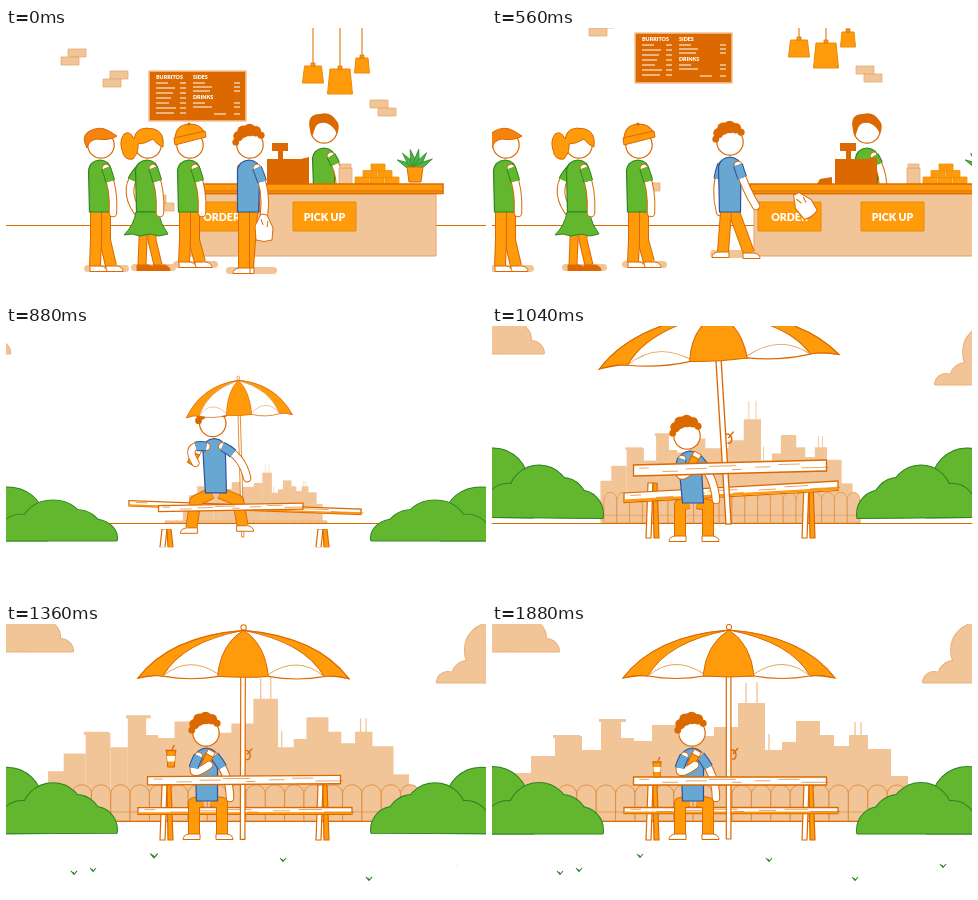
Write an HTML page with a canvas that moves like this. It is 480 px wide and 270 px high and loops after 3200 ms.

```html
<!DOCTYPE html>
<html lang="en">
<head>
<meta charset="utf-8">
<title>From the queue to the park</title>
<style>
html, body { margin: 0; width: 100%; height: 100%; overflow: hidden; background: #fff; }
canvas { display: block; width: 100vw; height: 100vh; }
</style>
</head>
<body>
<canvas id="stage"></canvas>
<script>
const canvas = document.getElementById('stage');
const c = canvas.getContext('2d');
const LOOP = 3200, STEP = 40;
const ORANGE = '#ff9b0b', DARK = '#dc6900', TAN = '#f2c598', EDGE = '#e3a468', GREEN = '#62b72f',
      LEAF = '#2d8422', BLUE = '#69a7d3', NAVY = '#2e519c', WHITE = '#fff';

// Smooth interpolation through rows of [time, ...values].
function at(t, ...rows) {
  const n = rows.length - 1;
  if (t <= rows[0][0]) return rows[0].slice(1);
  if (t >= rows[n][0]) return rows[n].slice(1);
  const i = rows.findIndex(r => r[0] > t) - 1, a = rows[i], b = rows[i + 1];
  const h = b[0] - a[0], u = (t - a[0]) / h;
  const slope = (k, j) => k < 1 || k >= n ? 0
    : (rows[k + 1][j] - rows[k - 1][j]) / (rows[k + 1][0] - rows[k - 1][0]);
  return a.slice(1).map((v, k) => {
    const j = k + 1;
    return v * (1 + 2 * u) * (1 - u) ** 2 + b[j] * u * u * (3 - 2 * u)
      + h * (slope(i, j) * u * (1 - u) ** 2 + slope(i + 1, j) * u * u * (u - 1));
  });
}
// Accelerating exit: `dist` is the travel reached after 480 ms.
const exit = (t, dist, power) => dist * (Math.max(0, t - 80) / 480) ** power;
const mix = (a, b, k) => a + (b - a) * k;

function group(x, y, draw, rot = 0, sx = 1, sy = sx) {
  c.save();
  c.translate(x, y);
  c.rotate(rot);
  c.scale(sx, sy);
  draw();
  c.restore();
}
function paint(fill, line, w = 1) {
  if (fill) { c.fillStyle = fill; c.fill(); }
  if (line) { c.strokeStyle = line; c.lineWidth = w; c.stroke(); }
}
function box(x, y, w, h, fill, line, lw) {
  c.beginPath(); c.rect(x, y, w, h); paint(fill, line, lw);
}
// Upright trapezoid around x, from top to bottom.
function taper(x, top, bottom, wTop, wBottom, fill, line, lw) {
  c.beginPath();
  c.moveTo(x - wTop / 2, top); c.lineTo(x + wTop / 2, top);
  c.lineTo(x + wBottom / 2, bottom); c.lineTo(x - wBottom / 2, bottom);
  c.closePath(); paint(fill, line, lw);
}
function pill(x, y, w, h, fill) {
  c.beginPath(); c.roundRect(x, y, w, h, h / 2); paint(fill);
}
function seg(x1, y1, x2, y2, color = DARK, w = 1) {
  c.beginPath(); c.moveTo(x1, y1); c.lineTo(x2, y2); paint(null, color, w);
}
function disc(x, y, r, fill, line, w) {
  c.beginPath(); c.arc(x, y, r, 0, 7); paint(fill, line, w);
}
function shape(d, fill, line, w = 1) {
  const p = new Path2D(d);
  if (fill) { c.fillStyle = fill; c.fill(p); }
  if (line) { c.strokeStyle = line; c.lineWidth = w; c.stroke(p); }
}
function text(s, x, y, size, align = 'left') {
  c.font = `900 ${size}px Lato, sans-serif`;
  c.textAlign = align;
  c.fillStyle = WHITE;
  c.fillText(s, x, y);
}
// Union of circles cut flat at a base line.
function blob(base, line, fill, ...circles) {
  c.save();
  c.beginPath(); c.rect(-200, base - 400, 900, 400); c.clip();
  for (const k of circles) disc(...k, null, line, 2);
  for (const k of circles) disc(...k, fill);
  c.restore();
  seg(Math.min(...circles.map(k => k[0] - k[2])), base, Math.max(...circles.map(k => k[0] + k[2])), base, line);
}

// ---- people ----
function tube(w, fill, line, trace) {
  c.lineJoin = 'round';
  for (const [width, color] of [[w + 2, line], [w, fill]]) {
    c.beginPath(); trace(); paint(null, color, width);
  }
  c.lineJoin = 'miter';
}
// `bend` pushes the elbow sideways from the shoulder-hand line.
function arm(ax, ay, hx, hy, bend, shirt, line) {
  const dx = hx - ax, dy = hy - ay, len = Math.hypot(dx, dy) || 1, k = .3;
  const bx = (ax + hx) / 2 - dy / len * bend, by = (ay + hy) / 2 + dx / len * bend;
  const mx = mix(ax, bx, k), my = mix(ay, by, k);
  c.lineCap = 'round';
  tube(6.5, WHITE, DARK, () => { c.moveTo(ax, ay); c.quadraticCurveTo(bx, by, hx, hy); });
  c.lineCap = 'butt';
  tube(8, shirt, line, () => {
    c.moveTo(ax, ay);
    c.quadraticCurveTo(mx, my, mix(mx, mix(bx, hx, k), k), mix(my, mix(by, hy, k), k));
  });
}
const leg = (hx, hy, kx, ky, fx, fy, w = 10) =>
  tube(w, ORANGE, DARK, () => { c.moveTo(hx, hy); c.lineTo(kx, ky); c.lineTo(fx, fy); });
const shoe = (x, y, dir = 1, rot = 0, fill = WHITE) => group(x, y, () => {
  c.rotate(rot);
  shape('M-6 0H5Q11 1 11 5.5H-6Z', fill, DARK);
}, 0, dir, 1);
function torso(sx, sy, hx, hy, fill, line) {
  c.beginPath();
  c.moveTo(hx - 10.5, hy); c.lineTo(sx - 11.5, sy + 9);
  c.quadraticCurveTo(sx - 10, sy, sx, sy - 1);
  c.quadraticCurveTo(sx + 10, sy, sx + 11, sy + 9);
  c.lineTo(hx + 10.5, hy); c.closePath();
  paint(fill, line, 1.2);
}
const HAIR = {
  short: () => shape('M-14 3Q-20-8-13-13Q-2-20 8-14L16-9Q9-4-4-6Q-12-5-14 3Z', '#f6820f', DARK),
  pony: () => shape('M-14-6Q-12-20 6-16Q17-13 15 2Q9 0 5-6Q-3-1-10-1Q-9 7-15 14Q-24 16-26 5Q-29-4-24-11Q-18-15-14-6Z', ORANGE, DARK),
  beanie: () => {
    shape('M-15-5Q-15-20-1-21Q13-21 15-9Z', ORANGE, DARK, 1.2);
    shape('M-16-7L15-14L16-8L-15 0Z', ORANGE, DARK);
    disc(-1, -21, 1.5, DARK);
  },
  curly: () => {
    for (let i = 0; i < 6; i++) {
      const a = -2.95 + i * .45;
      disc(14.5 * Math.cos(a), 15 * Math.sin(a), 3.4 + 3 * Math.sin(i * .62), DARK);
    }
  },
  clerk: () => shape('M-14 0Q-18-16-4-16Q6-19 12-10Q17-5 13 4Q10-4 2-7Q-8-9-10 1L-12 7Z', DARK)
};
function head(x, y, hair) {
  disc(x, y, 13.2, WHITE, DARK, 1.2);
  group(x, y, HAIR[hair]);
}
function queuer(x, hair, floor) {
  const woman = hair === 'pony', w = woman ? 7 : 10, sole = woman ? DARK : WHITE;
  group(x, 0, () => {
    pill(-17, floor - 1, 45, 7, TAN);
    if (woman) arm(-7, 140, -11, 183, 18, GREEN, LEAF);
    for (const [hip, foot] of [[4, 10], [-5, -6]]) {
      leg(hip, 184, hip, 212, foot, floor, w);
      shoe(foot + 1, floor, 1, 0, sole);
    }
    torso(-1, 133, -1, 184, GREEN, LEAF);
    if (woman) shape('M-12 184H10Q13 197 20 206L11 208L2 206L-8 208L-16 206L-24 207Q-14 197-12 184Z', GREEN, LEAF);
    arm(5, 140, 12, 185, -5, GREEN, LEAF);
    head(0, 117, hair);
  });
}
function hero(t) {
  const pose = (...p) => at(t, ...[80, 560, 720, 1040].map((time, i) => [time, ...p[i]]));
  const [x, y] = at(t, [80, 244, 117], [560, 238, 114], [720, 222, 89], [1040, 195, 110], [1200, 200, 109]);
  const [hx, hy] = pose([242, 184], [238, 184], [225, 158], [201, 177]);
  const handL = pose([250, 182, -8], [228, 184, 7], [180, 140, 9], [203, 141, 29]);
  const handR = pose([258, 187, -7], [264, 178, 3], [265, 131, -10], [224, 174, -8]);
  const footL = pose([238, 240], [231, 224], [190, 196], [188, 210]);
  const footR = pose([242, 240], [257, 225], [264, 192], [216, 210]);
  const [sit] = at(t, [720, 0], [1000, 1]);
  const [tilt] = at(t, [560, 0], [720, 1], [880, 0]);
  const sx = (x + hx) / 2, sy = y + 16, seated = t > 800;

  const limb = (side, [fx, fy], dir, rot) => {
    const top = hx + side * 4;
    leg(top, hy, mix((top + fx) / 2, fx, sit), mix((hy + fy) / 2, hy + 2, sit), fx, fy);
    shoe(fx, fy, dir, rot);
  };
  const reach = (side, hand) => arm(sx + side * 8, sy + 7, ...hand, BLUE, NAVY);

  if (!seated) reach(-1, handL);
  limb(1, footR, t < 320 ? -1 : 1, -.8 * tilt);
  limb(-1, footL, -1, .5 * tilt);
  torso(sx, sy, hx, hy, BLUE, NAVY);
  reach(1, handR);
  head(x, y, 'curly');
  if (seated) {
    group(handL[0] - 1, handL[1] - 7, () => {
      box(-4, -8, 8, 10, WHITE, DARK);
      taper(0, -3, 9, 8, 6, ORANGE, DARK);
    }, .5);
    reach(-1, handL);
  }
}

// ---- restaurant ----
function bricks(x, y, flip) {
  box(x + (flip ? 0 : 7), y, 18, 8, TAN, EDGE, .7);
  box(x + (flip ? 8 : 0), y + 8, 18, 8, TAN, EDGE, .7);
}
function menu(y) {
  box(143, y, 97, 50, DARK, TAN, 1.5);
  text('BURRITOS', 150, y + 8, 5.4);
  text('SIDES', 187, y + 8, 5.4);
  text('DRINKS', 187, y + 28, 5.4);
  const rows = (x, dy, count, gap, end) => {
    for (let i = 0; i < count; i++) {
      const ly = y + dy + i * gap;
      seg(x, ly, x + 12 + i * 7 % 9, ly, WHITE);
      seg(end - 6, ly, end, ly, WHITE);
    }
  };
  rows(150, 12, 7, 5, 180);
  rows(187, 12, 3, 4, 234);
  rows(187, 32, 2, 4, 234);
  rows(208, 43, 1, 0, 234);
}
function lamp(x, y, w, h) {
  seg(x, -60, x, y);
  taper(x, y, y + h, w * .8, w, ORANGE, '#e98a08');
  box(x - 2, y - 3, 4, 3, ORANGE, DARK, .7);
}
function clerk() {
  torso(318, 121, 318, 158, GREEN, LEAF);
  arm(325, 128, 334, 157, -4, GREEN, LEAF);
  head(318, 102, 'clerk');
}
function sign(x, label) {
  box(x, 174, 63, 29, ORANGE, '#e98a08');
  text(label, x + 31.5, 192.5, 10.6, 'center');
}
function counter() {
  shape('M243 156L246 151L258 149V156ZM261 131H295L303 129V156H261ZM266 115H282V123H277V131H272V123H266Z', DARK);
  box(333, 140, 13, 16, TAN, EDGE, .7);
  box(334, 136, 11, 4, TAN, EDGE, .7);
  for (let row = 0; row < 3; row++)
    for (let i = 0; i < 3 - row; i++) box(349 + i * 15 + row * 8, 149 - row * 6.5, 14, 7, ORANGE, '#e98a08', .7);
  for (let i = 0; i < 6; i++) group(409, 141, () => shape('M-3 0Q-3-10 0-20Q3-10 3 0Z', '#49b349', LEAF, .7), -1.1 + i * .43);
  taper(409, 139, 154, 16, 12, ORANGE, DARK);
  box(180, 166, 250, 62, TAN, EDGE);
  box(176, 156, 261, 9.5, ORANGE, DARK, 1.5);
  seg(176, 163, 437, 163);
  sign(184, 'ORDER');
  sign(287, 'PICK UP');
}
function restaurant(t) {
  bricks(55, 21 - exit(t, 45, 4));
  bricks(97, 43 - exit(t, 51, 4));
  bricks(364, 72 - exit(t, 34, 4), true);
  bricks(142, 167 - exit(t, 20, 5.5), true);
  menu(43 - exit(t, 38, 4));
  group(0, -exit(t, 26, 4), () => {
    lamp(307, 38, 21, 17);
    lamp(334, 41, 25, 25);
    lamp(356, 30, 15, 15);
  });
  group(exit(t, 57, 4.3), 0, clerk);
  group(exit(t, 82, 3.57), 0, counter);
  queuer(95 - exit(t, 81, 4), 'short', 238);
  queuer(142 - exit(t, 55, 4.4), 'pony', 237);
  queuer(184 - exit(t, 37, 4.7), 'beanie', 234);
}
function bag(t) {
  if (t >= 840) return;
  const [x, y, rot, s] = at(t, [400, 258, 200, 0, 1], [560, 312, 177, -.6, 1], [720, 299, 87, -2.1, 1], [840, 204, 133, -3, .5]);
  group(x, y, () => shape('M-8 12L-9-2L-3-14L3-13L9 0L8 12Q0 15-8 12ZM-3-9L-1-3M4-7L3-1', WHITE, DARK), rot, s);
}

// ---- park ----
const TOWERS = [ // left, width, top
  [22, 18, 149], [39, 24, 132], [63, 27, 112], [90, 19, 126], [109, 20, 96], [128, 14, 114], [140, 21, 117],
  [160, 26, 101], [185, 38, 112], [222, 25, 103], [246, 27, 79], [272, 20, 126], [290, 16, 118], [304, 24, 97],
  [327, 15, 111], [340, 18, 122], [357, 19, 111], [374, 25, 125], [398, 18, 152]];
const MASTS = [[254, 59], [265, 58], [277, 110], [363, 98], [369, 98]];
function city(t) {
  if (t < 780) return;
  const [sx, sy] = at(t, [760, .1, 0], [900, .4, .5], [1040, .64, .88], [1200, .82, 1.04], [1560, .995, 1], [1880, 1, 1]);
  group(262, 197, () => {
    c.translate(-262, -197);
    for (const [x, w, top] of TOWERS) box(x, top, w, 197 - top, TAN);
    for (const [x, top] of MASTS) box(x - .7, top, 1.4, 197 - top, TAN);
    for (const x of [61, 107]) box(x, x === 61 ? 111 : 95, 27, 3, TAN);
  }, 0, sx, sy);
}
function fence(t) {
  if (t < 860) return;
  const [sx, sy] = at(t, [840, .4, 0], [1040, .66, .85], [1200, .9, 1.02], [1400, 1, 1]);
  group(240, 197, () => {
    for (let i = -10; i < 10; i++) group(i * 19.4, 0, () => shape('M0 0V-27C1-39 18.4-39 19.4-27V0Z', TAN, '#e08a3a', .9));
    seg(-194, -9, 194, -9, '#e08a3a', .7);
  }, 0, sx, sy);
}
function clouds(t) {
  if (t < 800) return;
  const [dx] = at(t, [800, 75], [1040, 15], [1200, 2], [1480, 0]);
  group(-dx, 0, () => blob(28, '#e8b27c', TAN, [-2, 14, 18], [20, 12, 16], [36, 14, 18], [54, 28, 13]));
  group(dx * .8, 0, () => blob(59, '#e8b27c', TAN, [442, 59, 11], [462, 53, 16], [486, 26, 27], [482, 50, 22]));
}
function bush(dy, rot, sy) {
  group(50, 210 + dy, () => {
    blob(0, LEAF, GREEN, [-49, -32, 35], [-30, -12, 22]);
    blob(0, LEAF, GREEN, [-34, -9, 24], [-3, -20, 31], [20, -14, 25], [38, -4, 23]);
  }, rot, 1, sy);
}
function bushes(t) {
  if (t < 700) return;
  const [dy, rot, sy] = at(t, [720, 54, 0, .01], [880, 5, 0, .8], [1040, -18, .01, 1.03], [1200, -15, .04, 1.02],
    [1400, 2, -.01, .98], [1560, 0, 0, 1]);
  bush(dy, rot, sy);
  group(476, 0, () => bush(dy, rot, sy), 0, -1, 1);
}
// Board given by centre, length, height of the middle, drop from left to right, thickness.
function plank([x, len, y, drop, h], strip) {
  c.save();
  c.transform(1, drop / len, 0, 1, x, y);
  box(-len / 2, 0, len, h, WHITE, DARK, 1.3);
  if (h > 4) {
    if (strip) seg(-len / 2, h * .82, len / 2, h * .82, ORANGE, h * .28);
    for (let i = 0; i < 8; i++) {
      const start = len * (i * .12 - .47), row = h * (.3 + i * 2 % 3 * .18);
      seg(start, row, start + len * (.05 + i * 5 % 4 * .03), row, DARK, .6);
    }
  }
  c.restore();
}
function seat(t) {
  if (t < 660) return;
  plank(at(t, [640, 239, 10, 203, 1, .2], [720, 239, 210, 201.5, 27, .4], [1040, 239, 214, 161, -12, 9.5],
    [1200, 239, 214, 179, -2, 8], [1400, 239, 214, 184, 0, 6.5], [1560, 239, 214, 183.5, 0, 6]), true);
  if (t < 800) seg(222, 203, 256, 208);
}
function tableTop(t) {
  if (t < 700) return;
  plank(at(t, [680, 210, 10, 232, 0, .2], [720, 210, 75, 227, 0, .2], [1040, 238, 193, 136.5, -5, 11],
    [1200, 238, 193, 140.5, -7, 10], [1400, 238, 193, 154, 0, 8], [1560, 238, 193, 153, 0, 8]));
}
function tableLegs(t) {
  if (t < 780) return;
  const [dy, sy] = at(t, [760, 10, 0], [1040, -4, 1], [1200, 0, 1]);
  for (const x of [154, 310]) group(x, 216 + dy, () => {
    shape('M2-55H7L5 0H0Z', WHITE, DARK, 1.2);
    shape('M7-55H11L13 0H8Z', ORANGE, DARK, 1.2);
  }, 0, 1, sy);
}
function umbrella(t, part) {
  if (t < 720) return;
  const [dy, sx, sy, rot] = at(t, [720, 19, .03, .015, 0], [880, -4, .5, .75, -.03], [1040, -17, 1.13, 1.01, -.061],
    [1200, -5, 1.085, 1, -.022], [1400, 1, .98, 1, .006], [1560, 0, 1, 1, 0]);
  group(237, 215 + dy, part, rot, sx, sy);
}
function pole() {
  box(-2.7, -165, 4.6, 165, WHITE, DARK, 1.2);
  shape('M2-89Q7-89 7-84Q7-79 3-80M4-85L9-91', null, DARK, 1.3);
}
function canopy() {
  for (const side of [-1, 1]) group(0, -209, () => {
    shape('M0 0Q74 6 106 48Q85 44 81 46Q53 51 25 46H0Z', WHITE, DARK, 1.2);
    shape('M106 48Q74 6 0 0Q62 12 81 46Q94 44 106 48Z', ORANGE, DARK);
    shape('M25 44Q55 24 81 46', null, '#e49a4c', .9);
  }, 0, side, 1);
  shape('M-26-163Q-23-195 0-209Q22-195 25-163Q0-161-26-163Z', ORANGE, DARK);
  disc(0, -212, 2.7, WHITE, DARK);
}
function cup(t) {
  if (t < 1260) return;
  const [y, s] = at(t, [1240, 146, 0], [1360, 143, 1.1], [1480, 153, 1]);
  group(165, y, () => {
    taper(0, -15, 0, 8, 6, ORANGE, DARK);
    taper(0, -10, -5, 7.4, 6.4, WHITE);
    shape('M-5-15H5M1-16L3-20', null, DARK, 1.2);
  }, 0, s);
}
function grass(t) {
  const tufts = [[277, 236], [87, 246], [68, 249], [148, 232], [363, 255], [451, 242]];
  tufts.forEach(([x, y], i) => {
    const start = 1060 + i * 55;
    if (t <= start) return;
    const [s] = at(t, [start, 0], [start + 100, 1.2], [start + 200, 1]);
    group(x, y, () => shape('M-3-2L0 1.5L3-2M0 1.5L-1-1', null, LEAF, 1.1), 0, s);
  });
}
function sparks(t) {
  if (t < 680 || t > 780) return;
  const d = 79 + (t - 720) / 10;
  for (const dir of [-1, 1]) group(238 + dir * d, 175, () =>
    shape('M-6 0L-2 2M-3-3L-1-1M2-1L6-2M3 2L5 1', null, DARK, 1.3), 0, dir, 1);
}
function shadow(t) {
  if (t > 760) return;
  pill(...at(t, [80, 220, 239, 51, 7], [560, 218, 222, 46, 8], [720, 200, 224, 21, 3]), TAN);
}

function draw(t) {
  c.fillStyle = WHITE;
  c.fillRect(0, 0, 480, 270);
  city(t);
  fence(t);
  seg(0, 197.5, 480, 197.5, DARK, 1.1);
  clouds(t);
  if (t < 960) restaurant(t);
  bushes(t);
  grass(t);
  sparks(t);
  tableLegs(t);
  seat(t);
  umbrella(t, pole);
  shadow(t);
  if (t < 880) tableTop(t);
  hero(t);
  bag(t);
  if (t >= 880) tableTop(t);
  cup(t);
  umbrella(t, canopy);
}
function frame(now) {
  const w = Math.round(innerWidth * devicePixelRatio), h = Math.round(innerHeight * devicePixelRatio);
  if (canvas.width !== w || canvas.height !== h) { canvas.width = w; canvas.height = h; }
  c.setTransform(w / 480, 0, 0, h / 270, 0, 0);
  draw(Math.floor(now % LOOP / STEP) * STEP);
  requestAnimationFrame(frame);
}
frame(0);
</script>
</body>
</html>
```
